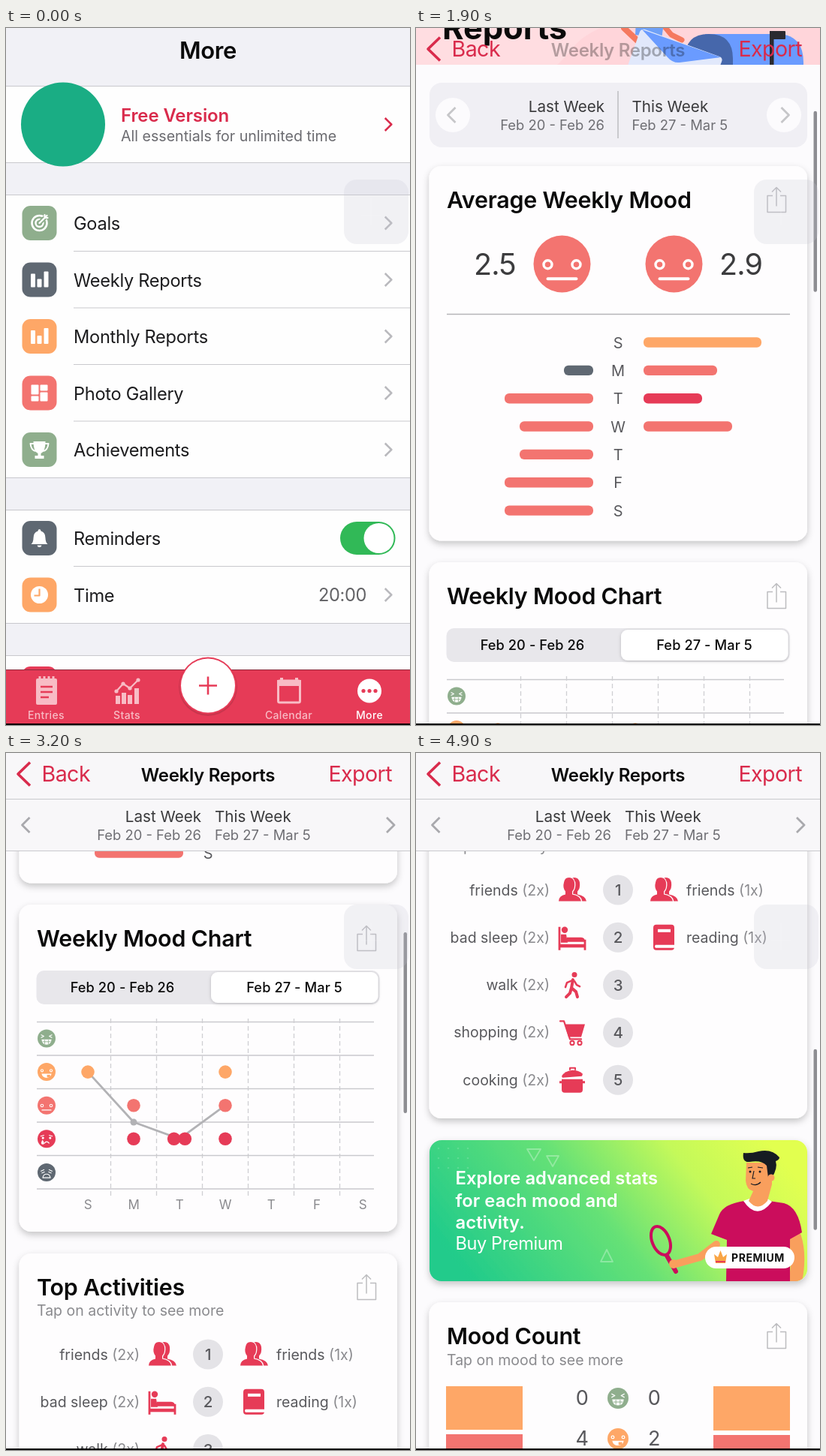
An HTML page that plays this animation: 538 px wide and 929 px high, repeating every 5000 ms.

```html
<!DOCTYPE html>
<html lang="en">
<head>
<meta charset="utf-8">
<title>Weekly reports</title>
<style>
html, body { margin: 0; width: 100%; height: 100%; overflow: hidden; background: #fff; }
svg { display: block; width: 100%; height: 100%; }
text { font-family: Inter, Roboto, sans-serif; white-space: pre; }
</style>
</head>
<body>
<svg id="stage" viewBox="0 0 538 929"></svg>
<script>
const RED = '#e63b57', CORAL = '#f37470', ORANGE = '#fea767', GREEN = '#8fae8d', SLATE = '#5f6872';
const INK = '#1c1c1e', GRAY = '#8a8a8e', LINE = '#c9c9cd', ACCENT = '#d92b4c';
const MOODS = [GREEN, ORANGE, CORAL, RED, SLATE];
const WEEK = [...'SMTWTFS'];

// --- drawing helpers -------------------------------------------------
const attrs = o => Object.entries(o).map(([k, v]) => `${k}="${v}"`).join(' ');
const rect = (x, y, w, h, fill, r = 0, o = {}) =>
  `<rect x="${x}" y="${y}" width="${w}" height="${h}" rx="${r}" fill="${fill}" ${attrs(o)}/>`;
const circ = (x, y, r, fill, o = {}) => `<circle cx="${x}" cy="${y}" r="${r}" fill="${fill}" ${attrs(o)}/>`;
const fill = (d, c, o = {}) => `<path d="${d}" fill="${c}" ${attrs(o)}/>`;
const line = (d, c, w = 1, o = {}) =>
  `<path d="${d}" fill="none" stroke="${c}" stroke-width="${w}" stroke-linejoin="round" ${attrs(o)}/>`;
const pen = (d, c, w) => line(d, c, w, { 'stroke-linecap': 'round' });
const group = (inner, o = {}) => `<g ${attrs(o)}>${inner}</g>`;
const at = (x, y, inner) => group(inner, { transform: `translate(${x} ${y})` });
const text = (x, y, s, size, color = INK, { w = 400, a = 'start', ls = -0.015 } = {}) =>
  `<text x="${x}" y="${y}" font-size="${size}" fill="${color}" font-weight="${w}" text-anchor="${a}" letter-spacing="${(ls * size).toFixed(2)}">${s}</text>`;
const title = (y, s) => text(41, y, s, 30.4, '#0a0a0a', { w: 600, ls: -0.007 });
const chevron = (x, y, c, w = 2.6, h = 8.5, dir = 1) =>
  line(`M${x - dir * h / 2} ${y - h}l${dir * h} ${h}l${-dir * h} ${h}`, c, w);
const card = (y, h) => rect(17.5, y, 503.5, h, '#fefdfe', 16, { filter: 'url(#soft)' });
const share = y => line(`M475 ${y + 12}H468V${y + 34}H492.5V${y + 12}H485M480 ${y + 26}V${y + 1}M474 ${y + 7}l6 -6l6 6`, '#bdbdc0', 1.5);

function face(x, y, r, mood) {
  const c = '#fff', w = 0.09;
  const eyes = (ey, er) => circ(-.5, ey, er, 'none', { stroke: c, 'stroke-width': w }) + circ(.5, ey, er, 'none', { stroke: c, 'stroke-width': w });
  const marks = [
    line('M-.62 -.42l.32 .17l-.32 .17M.62 -.42l-.32 .17l.32 .17', c, w) + fill('M-.55 .1H.55Q.5 .68 0 .68T-.55 .1Z', c) + line('M-.45 .36H.45M-.2 .15V.62M.2 .15V.62', GREEN, .07),
    eyes(-.15, .13) + fill('M-.55 .2H.55Q.45 .65 0 .65T-.55 .2Z', c) + fill('M.05 .32H.4V.6H.05Z', ORANGE),
    eyes(.02, .145) + pen('M-.5 .52H.5', c, .1),
    pen('M-.65 -.3L-.3 -.4M.65 -.3L.3 -.4', c, w) + circ(-.4, -.1, .13, c) + circ(.4, -.1, .13, c) + line('M-.25 .5Q0 .15 .3 .5', c, .1) + fill('M-.45 .1Q-.75 .6 -.42 .62T-.45 .1Z', c),
    line('M-.65 -.12L-.25 -.3M.65 -.12L.25 -.3M-.55 .1L-.2 -.05M.55 .1L.2 -.05', c, w) + line('M-.42 .6Q-.35 .2 0 .2T.42 .6Z', c, w)
  ][mood];
  return group(circ(0, 0, 1, MOODS[mood]) + marks, { transform: `translate(${x} ${y}) scale(${r})` });
}

// --- settings screen -------------------------------------------------
const rowIcons = {
  goal: circ(0, 0, 10, 'none', { stroke: '#fff', 'stroke-width': 2.6 }) + circ(0, 0, 5, 'none', { stroke: '#fff', 'stroke-width': 2.4 }) + pen('M0 0L9 -9', GREEN, 6) + pen('M0 0L10 -10M7 -7V-11M7 -7H11', '#fff', 2.2),
  bars: rect(-11.5, -8, 6, 18, '#fff', 1) + rect(-3, -1, 6, 11, '#fff', 1) + rect(6, -11, 6, 21, '#fff', 1),
  photo: rect(-11, -11, 10, 13, '#fff', 1) + rect(1, -11, 10, 8, '#fff', 1) + rect(-11, 4, 10, 7, '#fff', 1) + rect(1, -1, 10, 12, '#fff', 1),
  cup: fill('M-8 -11H8Q8 3 2 5V8H6V12H-6V8H-2V5Q-8 3 -8 -11Z', '#fff') + line('M-7 -8H-12Q-11 1 -5 2M7 -8H12Q11 1 5 2', '#fff', 2),
  bell: fill('M0 -12Q2 -12 2 -9.5Q8 -8 8 0Q8 5 11 8H-11Q-8 5 -8 0Q-8 -8 -2 -9.5Q-2 -12 0 -12ZM-3 9.5H3Q2.5 12 0 12T-3 9.5Z', '#fff'),
  clock: circ(0, 0, 11.5, '#fff') + line('M0 -8V1H-7', ORANGE, 2.2)
};
const row = (y, label, icon, color) =>
  rect(21.5, y - 23, 46, 46, color, 11) + at(44.5, y, rowIcons[icon]) + text(90, y + 9, label, 23.6, INK, { ls: -0.012 });

function settings() {
  const rows = [['Goals', 'goal', GREEN], ['Weekly Reports', 'bars', SLATE], ['Monthly Reports', 'bars', ORANGE], ['Photo Gallery', 'photo', CORAL], ['Achievements', 'cup', GREEN]];
  const panel = (y, h) => rect(-1, y + .5, 540, h, '#fefefe', 0, { stroke: LINE });
  const tab = (x, s, c) => text(x, 921, s, 14, c, { a: 'middle', w: 500, ls: .025 });
  const pale = '#f8bcc5';
  let s = rect(0, 0, 538, 929, '#f1f1f6') + text(269, 41, 'More', 31, '#0a0a0a', { w: 600, a: 'middle', ls: -0.01 });
  s += panel(77, 102) + panel(222, 377) + panel(642, 151) + panel(836, 100);
  s += circ(76, 128.5, 56, '#1aad84');
  s += text(153, 125, 'Free Version', 24, ACCENT, { w: 600, ls: -0.005 }) + text(153, 151, 'All essentials for unlimited time', 19.6, '#6b6b70', { ls: 0 });
  s += chevron(509, 128.5, ACCENT);
  s += rect(0, 298, 538, 75, '#d5d5da', 0, { id: 'press' });
  rows.forEach(([label, icon, c], i) => {
    const y = 260 + i * 75.5;
    s += row(y, label, icon, c) + chevron(509, y, '#b9b9bd');
    if (i) s += line(`M90 ${y - 38}H538`, LINE);
  });
  s += row(680, 'Reminders', 'bell', SLATE) + line('M90 717.5H538', LINE) + row(755.5, 'Time', 'clock', ORANGE);
  s += rect(445, 658, 73.5, 44, '#31b957', 22) + circ(496.5, 680, 20, '#fff');
  s += text(480, 764, '20:00', 23.6, '#636366', { a: 'end' }) + chevron(509, 755.5, '#b9b9bd');
  s += rect(21.5, 851, 46, 46, RED, 11);
  s += rect(0, 856, 538, 73, RED) + line('M0 855.5H538', '#8c2b3c');
  s += circ(269, 878, 39, '#000', { opacity: .12 }) + circ(269, 876.5, 38, RED) + circ(269, 876.5, 36, '#fff') + line('M257 876.5H281M269 864.5V888.5', RED, 2.6);
  s += rect(40, 867, 28, 35, pale, 2) + line('M45 864V870M51 864V870M57 864V870M63 864V870', pale, 3) + line('M46 878H62M46 885H62M46 892H57', RED, 2.5);
  s += [[146, 890], [154, 886], [162, 889], [171, 880]].map(([x, y]) => rect(x, y, 6, 901 - y, pale)).join('');
  s += line('M147 884L156 874L165 880L176 869', pale, 2.2) + [[147, 884], [156, 874], [165, 880], [176, 869]].map(p => circ(...p, 2.6, pale)).join('');
  s += rect(362.5, 870, 29, 29, 'none', 2, { stroke: pale, 'stroke-width': 3 }) + rect(361, 869, 32, 8, pale) + line('M367 866V872M387 866V872', pale, 4);
  s += circ(484, 883.5, 16, '#fff') + [476, 484, 492].map(x => circ(x, 883.5, 2.6, RED)).join('');
  return s + tab(53.5, 'Entries', pale) + tab(161, 'Stats', pale) + tab(376.5, 'Calendar', pale) + tab(484, 'More', '#fff');
}

// --- report screen ---------------------------------------------------
function postman() {
  const blue = '#6a9bff', deep = '#4667ab', dark = '#2b2a30', skin = '#f5795f', shirt = '#6ea0f7';
  let s = fill('M92 227C120 160 160 175 205 120C240 70 330 75 380 60S470 10 538 60V227Z', '#ffd5da');
  s += rect(435, 180, 28, 47, '#5486ee') + rect(435, 180, 28, 18, deep);
  s += fill('M385 97H480Q516 97 516 135V187H385Z', blue) + rect(415, 140, 101, 18, '#4b78d4') + rect(415, 168, 101, 2, '#4b78d4');
  s += fill('M358 188V130Q358 97 390 97T422 130V192H358Z', deep) + rect(312, 187, 78, 5, blue, 2.5);
  s += rect(471, 93, 21, 11, dark, 1) + rect(471, 93, 5.5, 64, dark) + circ(474, 156.5, 7.5, dark);
  s += fill('M291 140L309 147L292 197L281 206L276 202L284 192Z', dark) + fill('M310 145L338 150L330 212H319L317 180Z', dark);
  s += fill('M267 207L274 204L288 218L284 221Q276 212 267 210Z', dark) + fill('M318 216H330L337 227H317Z', dark);
  s += line('M277 204L285 208M318 214H330', skin, 3);
  s += fill('M302 40H315V58H302Z', skin) + fill('M299 26H317L318 40Q316 48 310 47Q300 46 299 26Z', skin);
  s += fill('M297 25H304V36H300Z', dark) + fill('M295 18Q308 12 322 17L321 25H296Z', shirt) + fill('M306 23L326 24V27H306Z', '#3d68bd');
  s += pen('M325 80L340 98L354 105', skin, 7) + pen('M285 72L277 89L295 106', skin, 8);
  s += fill('M299 52L320 54Q329 60 331 75L327 104L292 98L293 78L279 72Q286 54 299 52Z', shirt) + fill('M299 50L308 60L319 50L321 57L312 62L300 59Z', '#fff');
  s += fill('M305 91L404 127Q409 129 407 134L390 178Q388 182 383 181L284 148Q280 146 281 142L298 94Q300 90 305 91Z', '#e1e8fb');
  return s + fill('M301 91L406 128L351 135Q342 136 335 128Z', blue);
}

function hero() {
  const big = (y, s) => text(35, y, s, 43.5, '#0a0a0a', { w: 700, ls: -0.002 });
  return group(rect(0, 0, 538, 227, '#ffdde1') + group(postman(), { id: 'art' }), { 'clip-path': 'url(#heroClip)' }) +
    big(138, 'Weekly') + big(193, 'Reports');
}

const weeks = (lx, rx, y) =>
  text(lx, y, 'Last Week', 20.6, '#3a3a3c', { a: 'end', ls: 0 }) + text(lx, y + 23.5, 'Feb 20 - Feb 26', 18.4, '#6e6e73', { a: 'end', ls: 0 }) +
  text(rx, y, 'This Week', 20.6, '#3a3a3c', { ls: 0 }) + text(rx, y + 23.5, 'Feb 27 - Mar 5', 18.4, '#6e6e73', { ls: 0 });

function picker() {
  const arrow = (x, dir) => circ(x, 294, 23, '#fcfbfd') + chevron(x + dir * 1.5, 294, '#c6c6c9', 2.8, 10, dir);
  return rect(18, 251, 503, 86, '#f0eff4', 16) + arrow(49, -1) + arrow(490, 1) + line('M269 262V325', '#bcbcc0', 1.5) + weeks(251, 287.5, 290);
}

function average() {
  const left = [0, [39, SLATE], [118, CORAL], [98, CORAL], [98, CORAL], [118, CORAL], [118, CORAL]];
  const right = [[157, ORANGE], [98, CORAL], [78, RED], [118, CORAL]];
  let s = card(362, 499.5) + title(418, 'Average Weekly Mood') + share(389.5);
  s += text(133, 507, '2.5', 39.5, '#3c3c3e', { a: 'end', ls: -0.02 }) + text(404, 507, '2.9', 39.5, '#3c3c3e', { ls: -0.02 });
  s += face(194.5, 492.5, 38, 2) + face(343.5, 492.5, 38, 2) + line('M41 559.5H498', '#b5b5b8', 1.3);
  WEEK.forEach((d, i) => {
    const y = 597 + i * 37.35, [l, r] = [left[i], right[i]];
    s += text(269, y + 7.5, d, 20, '#58585c', { a: 'middle' });
    if (l) s += rect(236 - l[0], y - 6.7, l[0], 13.4, l[1], 6);
    if (r) s += rect(303, y - 6.7, r[0], 13.4, r[1], 6);
  });
  return s;
}

function chart() {
  const gx = i => 109 + 61 * i, gy = i => 1068.5 + 44.6 * i;
  const dots = [[0, 1], [3, 1], [1, 2], [3, 2], [1, 3], [1.88, 3], [2.12, 3], [3, 3]];
  const seg = { a: 'middle', w: 500, ls: .005 };
  let s = card(890, 436) + title(946, 'Weekly Mood Chart') + share(917.5);
  s += rect(40.5, 978, 457, 45, '#e8e7eb', 10) + rect(273, 980, 222.5, 41, '#fff', 9, { filter: 'url(#thin)' });
  s += text(155, 1007, 'Feb 20 - Feb 26', 18.2, '#0a0a0a', seg) + text(384, 1007, 'Feb 27 - Mar 5', 18.2, '#0a0a0a', seg);
  for (let i = 0; i < 6; i++) {
    s += line(`M41 ${1046.5 + 44.5 * i}H490`, LINE, 1.3);
    s += line(`M${139.5 + 61 * i} 1042V1281`, '#cfcfd3', 1.3, { 'stroke-dasharray': '6 4' });
  }
  MOODS.forEach((_, i) => s += face(54, gy(i), 12, i));
  s += line(`M${gx(0)} ${gy(1)}L${gx(1)} ${gy(2.5)}L${gx(2)} ${gy(3)}L${gx(3)} ${gy(2)}`, '#b2b2b5', 2.8) + circ(gx(1), gy(2.5), 4.5, '#b2b2b5');
  s += dots.map(([d, m]) => circ(gx(d), gy(m), 8.8, MOODS[m])).join('');
  return s + WEEK.map((d, i) => text(gx(i), 1295.5, d, 17, GRAY, { a: 'middle' })).join('');
}

const head = 'M-7 -16Q1 -18 3 -10Q4 -2 0 2V6Q11 8 12 15H-18Q-18 8 -9 6V2Q-13 -3 -11 -10Q-10 -15 -7 -16Z';
const wheel = x => circ(x, 14, 2.6, 'none', { stroke: RED, 'stroke-width': 2 });
const things = {
  friends: at(7, 0, fill(head, RED)) + line(head, '#fefdfe', 2.5) + fill(head, RED),
  bed: line('M-17 -14V17M17 3V17', RED, 2.8) + rect(-17, 9, 34, 4.5, RED) + fill('M-7 0H12Q17 0 17 6H-7Z', RED) + circ(-10, -10, 4.2, RED) + fill('M-15 -4H-8L-6 7H-15Z', RED),
  walk: circ(3, -13.5, 3.5, RED) + pen('M1 -7L-1 4M-1 4L5 9L7 16M-1 4L-3 11L-8 16', RED, 4) + pen('M0 -6L-7 -3L-9 3M3 -5L6 0L10 2', RED, 2.6),
  cart: pen('M-16 -15H-11L-3 9H12', RED, 2.2) + fill('M-10 -11H17L12 6H-5Z', RED) + wheel(0) + wheel(10),
  pot: fill('M-14 -1H14V13Q14 17 10 17H-10Q-14 17 -14 13Z', RED) + line('M-14 3H-17M14 3H17', RED, 3) + fill('M-14 -5Q-10 -12 0 -13Q9 -13 14 -8L13 -5L-13 -3Z', RED) + line('M-3 -13V-16H4V-13', RED, 2),
  book: rect(-14, -17, 28, 34, RED, 4) + rect(-8, -11, 17, 4, '#fff') + fill('M-11 10H14V14H-11Q-13 12 -11 10Z', '#fff')
};

function activities() {
  const tally = (x, y, name, n, a) =>
    text(x, y, `${name} <tspan fill="${GRAY}">(${n}x)</tspan>`, 19.5, '#58585c', { a, ls: 0 });
  const list = [['friends', 'friends'], ['bad sleep', 'bed'], ['walk', 'walk'], ['shopping', 'cart'], ['cooking', 'pot']];
  let s = card(1355, 439) + title(1411, 'Top Activities') + text(41, 1438, 'Tap on activity to see more', 19.5, GRAY, { ls: 0 }) + share(1382.5);
  list.forEach(([name, icon], i) => {
    const y = 1489.5 + 63.3 * i;
    s += tally(178, y + 7, name, 2, 'end') + at(208, y, things[icon]);
    s += circ(269, y, 20, '#e4e3e7') + text(269, y + 7.5, i + 1, 20.5, '#58585c', { a: 'middle', w: 500 });
  });
  s += at(330, 1489.5, things.friends) + tally(360, 1496.5, 'friends', 1) + at(330, 1552.8, things.book);
  return s + tally(360, 1559.8, 'reading', 1);
}

function player() {
  const skin = '#f99f5d', top = '#cb0b5c', hair = '#191a24';
  let s = pen('M400 655L378 672L346 681', skin, 10) + pen('M504 645Q512 670 505 704', skin, 18);
  s += `<ellipse cx="326" cy="650" rx="11.5" ry="20" fill="none" stroke="${top}" stroke-width="4" transform="rotate(-22 326 650)"/>`;
  s += pen('M334 670L346 691', top, 6) + circ(343, 681, 6, skin);
  s += fill('M437 597Q410 601 404 615L393 641L414 649L413 704H498V648L514 639Q509 605 490 600L470 597Z', top);
  s += fill('M436 597Q454 624 474 598L468 594H444Z', '#fff') + fill('M440 546H474V575L468 597Q455 612 443 597L449 584Q440 582 439 570Z', skin);
  s += fill('M436 533Q434 546 444 545Q460 542 467 550L469 566L474 566Q482 553 479 544Q484 542 484 539Q474 527 456 531Q446 534 436 533Z', hair) + circ(473, 566, 4.5, skin);
  return s + circ(445, 558, 1.5, hair) + circ(458, 558, 1.5, hair) + line('M442 553L448 552M455 552L462 553M450 557L448 567H452M446 574Q453 578 459 572', hair, 1.2);
}

function banner() {
  const bold = (y, s) => text(52.5, y, s, 23.8, '#fff', { w: 600, ls: .002 });
  let s = rect(18, 516, 503, 188, 'url(#lime)', 16);
  s += line('M148 528H166L157 543ZM174 537H190L182 551ZM246 678H262L254 662Z', '#fff', 1.8, { opacity: .3 });
  for (let i = 0; i < 12; i++) s += circ(30 + (i % 4) * 13, 527 + (i >> 2) * 13, 1.3, '#fff', { opacity: .15 });
  s += group(player(), { 'clip-path': 'url(#bannerClip)' });
  s += bold(575, 'Explore advanced stats') + bold(604.5, 'for each mood and') + bold(634, 'activity.') + text(52.5, 662, 'Buy Premium', 23.6, '#fff', { ls: -0.018 });
  s += rect(385, 658, 119, 29, '#fff', 14.5);
  s += fill('M397 668L402 672L405.5 663L409 672L414 668L412 680H399Z', '#f9a545') + line('M399 678H412', RED, 2) + text(420, 677.5, 'PREMIUM', 14, '#111', { w: 700, ls: .04 });
  return at(0, 1307, group(s, { filter: 'url(#soft)' }));
}

function counts() {
  const n = (x, y, v) => text(x, y, v, 27, '#58585c', { a: 'middle' });
  let s = card(2039, 420) + title(2095, 'Mood Count') + text(41, 2123, 'Tap on mood to see more', 19.5, GRAY, { ls: 0 }) + share(2066.5);
  s += rect(40, 2151, 102, 58, ORANGE) + rect(40, 2215, 102, 90, CORAL) + rect(396, 2151, 102, 59, ORANGE) + rect(396, 2216, 102, 90, CORAL);
  return s + n(221, 2176, 0) + n(317, 2176, 0) + face(269, 2167, 14, 0) + n(221, 2230, 4) + n(317, 2230, 2) + face(269, 2221, 14, 1);
}

const report = () =>
  rect(0, 0, 538, 929, '#fcfbfd') +
  group(hero() + picker() + average() + chart() + activities() + banner() + counts(), { id: 'feed' }) +
  group(rect(0, 0, 538, 130, '#f8f7f9') + line('M0 61.5H538M0 130.5H538', LINE) + weeks(260, 278, 92) +
    chevron(26.5, 96, '#a9a9ad', 2.8, 10, -1) + chevron(512, 96, '#a9a9ad', 2.8, 10), { id: 'sticky' }) +
  group(text(269, 38, 'Weekly Reports', 24, '#0a0a0a', { w: 600, a: 'middle', ls: -0.012 }), { id: 'heading' }) +
  line('M32 12.5L16 28L32 43.5', ACCENT, 3.6) + text(47.5, 38, 'Back', 28.6, ACCENT, { ls: -0.02 }) + text(514, 38, 'Export', 28.6, ACCENT, { a: 'end', ls: -0.02 }) +
  rect(529.5, 66, 4.5, 241, '#8d8d92', 2.2, { id: 'bar' });

const shadow = (id, dy, dev, a) =>
  `<filter id="${id}" x="-10%" y="-10%" width="120%" height="125%"><feDropShadow dx="0" dy="${dy}" stdDeviation="${dev}" flood-color="#000" flood-opacity="${a}"/></filter>`;
const clip = (id, inner) => `<clipPath id="${id}">${inner}</clipPath>`;
const stage = document.getElementById('stage');
stage.innerHTML = `<defs>${shadow('soft', 4, 5, .22)}${shadow('thin', 1, 2, .2)}
  <linearGradient id="lime" x1="0" y1=".65" x2="1" y2=".35"><stop offset="0" stop-color="#20cb8b"/><stop offset=".45" stop-color="#66e176"/><stop offset=".75" stop-color="#c4f95a"/><stop offset="1" stop-color="#e2ff50"/></linearGradient>
  ${clip('bannerClip', rect(18, 516, 503, 188, '#000', 16))}${clip('heroClip', rect(0, 0, 538, 227, '#000'))}</defs>` +
  group(settings(), { id: 'old' }) + rect(0, 0, 538, 929, '#000', 0, { id: 'dim' }) + group(report(), { id: 'new' }) +
  rect(450, 202, 86, 86, '#c4c4d0', 17, { opacity: .22 }) + line('M486 227V263M473 250H499', '#fff', 1.2, { opacity: .2 }) +
  rect(0, 927, 538, 2, '#000');

// --- motion ----------------------------------------------------------
const LOOP = 5000, STEP = 100;
const scrollKeys = [[1100, 0], [1900, 178], [2700, 358], [3200, 688], [4200, 986], [4900, 1307], [5000, 1330]];
const slope = (a, b) => (b[1] - a[1]) / (b[0] - a[0]);
const tangents = scrollKeys.map((k, i) => {
  const p = scrollKeys[i - 1], n = scrollKeys[i + 1];
  if (!p || !n) return 0;
  const a = slope(p, k), b = slope(k, n);
  return 2 * a * b / (a + b);
});
function scrollAt(t) {
  if (t <= scrollKeys[0][0]) return 0;
  const i = scrollKeys.findIndex(k => k[0] > t) - 1;
  const [t0, y0] = scrollKeys[i], [t1, y1] = scrollKeys[i + 1], d = t1 - t0, u = (t - t0) / d, v = 1 - u;
  return v * v * (1 + 2 * u) * y0 + u * v * v * d * tangents[i] + u * u * (3 - 2 * u) * y1 - u * u * v * d * tangents[i + 1];
}
const ramp = (v, a, b) => Math.min(1, Math.max(0, (v - a) / (b - a)));
const el = Object.fromEntries(['old', 'new', 'dim', 'press', 'feed', 'art', 'sticky', 'heading', 'bar'].map(id => [id, document.getElementById(id)]));
const move = (e, x, y) => e.setAttribute('transform', `translate(${x.toFixed(2)} ${y.toFixed(2)})`);
const fade = (e, o) => e.setAttribute('opacity', o.toFixed(3));

function draw(t) {
  const push = 1 - (1 - ramp(t, 180, 680)) ** 3, y = scrollAt(t);
  fade(el.press, t >= 100 ? 1 : 0);
  move(el.old, -160 * push, 0);
  fade(el.dim, .1 * push);
  move(el.new, 538 * (1 - push), 0);
  move(el.feed, 0, -y);
  move(el.art, 0, y / 2); // parallax: the picture scrolls at half speed
  fade(el.sticky, ramp(y, 185, 205));
  fade(el.heading, ramp(y, 165, 208));
  move(el.bar, 0, .2515 * y);
  fade(el.bar, ramp(t, 1000, 1300));
}
function tick(now) {
  draw(Math.floor(now % LOOP / STEP) * STEP);
  requestAnimationFrame(tick);
}
draw(0);
requestAnimationFrame(tick);
</script>
</body>
</html>
```
